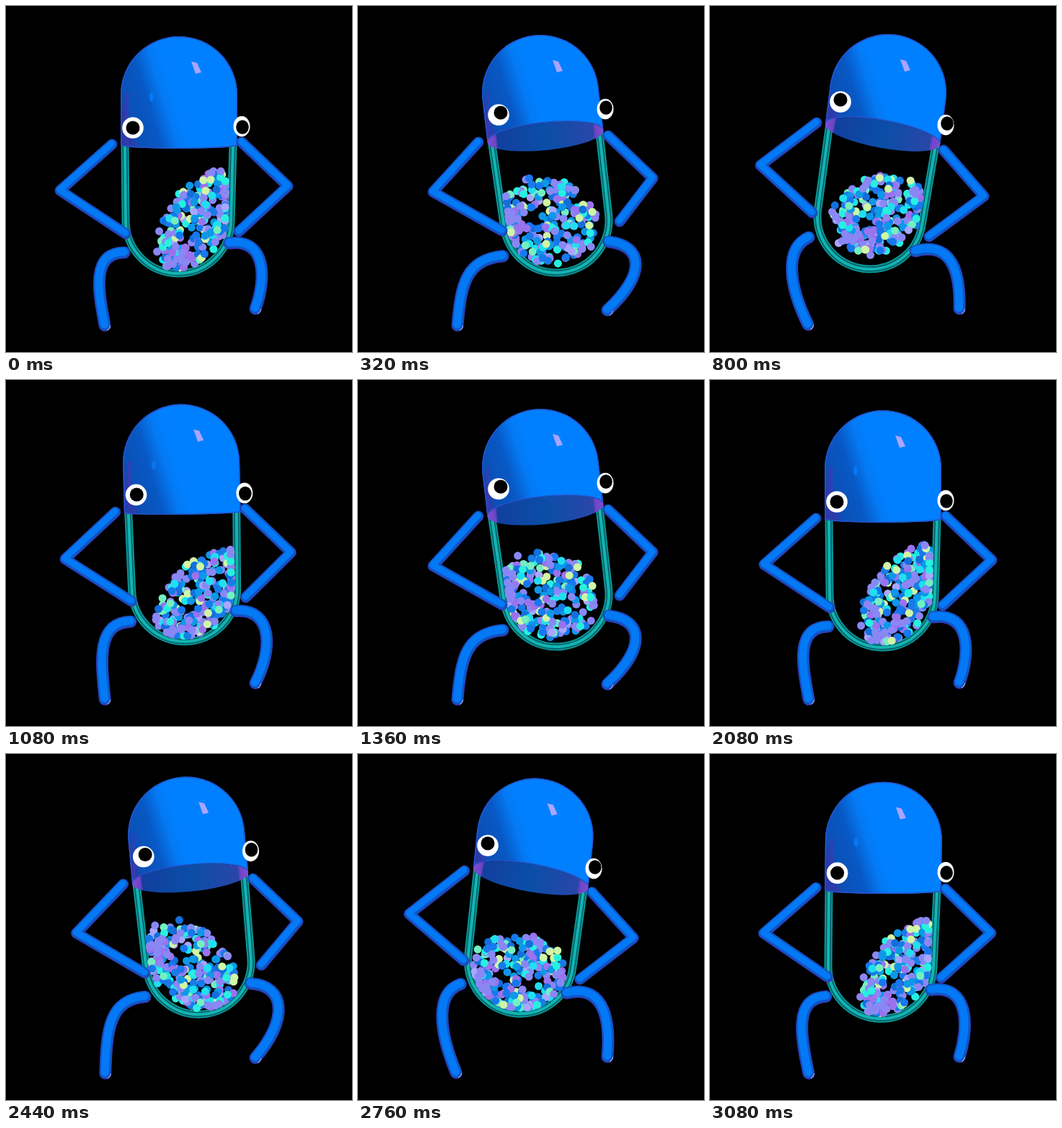
Write an HTML page with a canvas that moves like this. It is 480x480 px and loops after 3120 ms.

```html
<!DOCTYPE html>
<html lang="en">
<head>
<meta charset="utf-8">
<title>Dancing capsule</title>
<style>
html, body { margin: 0; width: 100%; height: 100%; overflow: hidden; background: #000; }
canvas { display: block; width: 100vmin; height: 100vmin; }
</style>
</head>
<body>
<canvas id="stage" width="480" height="480"></canvas>
<script>
const ctx = document.getElementById('stage').getContext('2d');
const LOOP = 3120, BEAT = 1040, STEP = 40, TAU = Math.PI * 2;

// Each joint: x, y when upright, leaning right, leaning left
const BODY = {
  head: [240, 123, 253, 121, 247, 120],
  base: [239, 298, 275, 297, 222, 292],
  rim: [240, 193, 260, 181, 239.5, 178],
  eyeL: [176, 169, 195, 151, 181, 133],
  pupilL: [176, 169, 198, 148, 181, 130],
  eyeR: [327, 167, 343, 143, 327, 165],
  pupilR: [328, 168, 344, 141, 329, 163]
};
const ARMS = [
  [[147, 192, 167, 189, 148, 162], [75, 256, 104, 258, 70, 221], [166, 316, 200, 312, 142, 287]],
  [[327, 189, 347, 180, 324, 200], [391, 250, 409, 239, 380, 264], [323, 313, 363, 299, 304, 320]]
];
const LEGS = [
  [[164, 342, 201, 347, 137, 321], [118, 343, 150, 352, 104, 336], [128, 395, 143, 385, 108, 385], [137, 443, 138, 443, 136, 442]],
  [[310, 329, 348, 327, 285, 340], [362, 322, 396, 333, 341, 325], [361, 380, 400, 372, 347, 380], [346, 420, 346, 422, 346, 420]]
];

// Tracks: time, then values
const SWAY = [[0, 0], [80, .5], [160, 1], [230, 1.23], [320, 1], [360, .78], [440, .3], [520, -.18],
  [600, -.53], [680, -.8], [800, -1], [850, -1.06], [920, -.72], [1000, -.12]];
const LIFT = [[0, 0], [40, 8], [80, 15], [120, 16.5], [160, 11], [220, 2], [280, -1], [320, 0], [360, 9],
  [400, 11.5], [440, 8], [500, 1], [560, 0], [600, 5], [640, 10.5], [680, 6], [740, 1], [800, 0],
  [840, 6], [880, 11], [920, 10], [960, 6], [1000, 3]];
// Pile: centre x, y, long and short radius, slope in degrees
const PILE = [[0, 264, 300, 78, 39, -58], [160, 281, 297, 72, 50, -20], [320, 262, 298, 70, 56, 18],
  [360, 256, 294, 73, 48, 42], [500, 238, 299, 70, 52, 38], [680, 220, 306, 66, 54, 0],
  [800, 232, 289, 66, 48, -30], [1000, 263, 300, 78, 37, -55]];

const COLORS = ['#187be8', '#1778ef', '#126fdc', '#8a87f5', '#8a87f5', '#9b72ee', '#a9a6ff',
  '#20dff0', '#27f0e0', '#0d98e8', '#d0f6a5', '#75efc0'];

let seed = 71;
function rand() {
  seed = (seed * 16807) % 2147483647;
  return seed / 2147483647;
}
const balls = Array.from({ length: 240 }, () => ({
  r: Math.sqrt(rand()) * 1.03,
  a: rand() * TAU,
  phase: rand() * TAU,
  turns: 1 + Math.floor(rand() * 3),
  color: COLORS[Math.floor(rand() * COLORS.length)]
}));

// Smooth cyclic interpolation through a track
function track(keys, t) {
  const n = keys.length;
  const key = i => {
    const wrap = Math.floor(i / n);
    const k = keys[i - wrap * n];
    return [k[0] + wrap * BEAT, ...k.slice(1)];
  };
  let i = n - 1;
  while (keys[i][0] > t) i--;
  const [a, b, c, d] = [key(i - 1), key(i), key(i + 1), key(i + 2)];
  const span = c[0] - b[0], u = (t - b[0]) / span;
  return b.slice(1).map((p, j) => {
    const q = c[j + 1];
    const m = (q - a[j + 1]) / (c[0] - a[0]) * span;
    const k = (d[j + 1] - p) / (d[0] - b[0]) * span;
    const u2 = u * u, u3 = u2 * u;
    return (2 * u3 - 3 * u2 + 1) * p + (u3 - 2 * u2 + u) * m + (3 * u2 - 2 * u3) * q + (u3 - u2) * k;
  });
}

function joint(p, w, lift, wy = Math.abs(w)) {
  const o = w > 0 ? 2 : 4;
  return [p[0] + (p[o] - p[0]) * Math.abs(w), p[1] + (p[o + 1] - p[1]) * wy - lift];
}

function stroke(path, color, width, dx = 0, dy = 0) {
  ctx.save();
  ctx.translate(dx, dy);
  ctx.strokeStyle = color;
  ctx.lineWidth = width;
  ctx.stroke(path);
  ctx.restore();
}

function oval(x, y, rx, ry, color, angle = 0) {
  ctx.fillStyle = color;
  ctx.beginPath();
  ctx.ellipse(x, y, rx, ry, angle, 0, TAU);
  ctx.fill();
}

function limb(path, width) {
  stroke(path, '#3438b4', width);
  stroke(path, '#0c58c6', width - 2, 0, -.6);
  stroke(path, '#0479f5', width - 6, -.5, -1.2);
}

function drawTube(base, rim, tilt, rimTilt) {
  const side = s => [rim[0] + s * 75 * Math.cos(rimTilt), rim[1] + s * 75 * Math.sin(rimTilt)];
  const path = new Path2D();
  path.moveTo(...side(1));
  path.arc(base[0], base[1], 73, tilt, tilt + Math.PI);
  path.lineTo(...side(-1));
  ctx.lineCap = 'butt';
  stroke(path, '#0a9696', 11);
  stroke(path, '#075c68', 7);
  stroke(path, '#12b5b0', 4);
}

function drawBalls(t, base, tilt) {
  const [cx, cy, long, short, deg] = track(PILE, t % BEAT);
  const slope = deg * Math.PI / 180;
  const [c, s] = [Math.cos(slope), Math.sin(slope)];
  const [ct, st] = [Math.cos(tilt), Math.sin(tilt)];
  for (const b of balls) {
    const spin = TAU * b.turns * t / LOOP + b.phase;
    const a = b.a + .3 * Math.sin(spin);
    const px = long * b.r * Math.cos(a), py = short * b.r * Math.sin(a);
    const dx = cx + px * c - py * s + 3 * Math.cos(spin) - base[0];
    const dy = cy + px * s + py * c + 3 * Math.sin(spin) - base[1];
    // Keep the ball inside the glass
    let x = dx * ct + dy * st, y = dy * ct - dx * st;
    const reach = y > 0 ? Math.hypot(x, y) : Math.abs(x);
    if (reach > 65) {
      x *= 65 / reach;
      if (y > 0) y *= 65 / reach;
    }
    oval(base[0] + x * ct - y * st, base[1] + x * st + y * ct, 5.5, 5.5, b.color);
  }
}

function drawCap(head, rim, open, tilt, rimTilt) {
  const [x, y] = head, bow = -5 + 24 * open;
  const cap = new Path2D();
  cap.arc(x, y, 81, Math.PI + tilt, tilt);
  cap.ellipse(rim[0], rim[1], 81, Math.abs(bow), rimTilt, 0, Math.PI, bow > 0);
  cap.closePath();

  const shade = ctx.createLinearGradient(x - 80, y + 20, x - 8, y - 2);
  shade.addColorStop(0, '#2b3bab');
  shade.addColorStop(.12, '#0b50b7');
  shade.addColorStop(.5, '#0858c4');
  shade.addColorStop(.8, '#047af4');
  shade.addColorStop(1, '#0080ff');
  ctx.fillStyle = shade;
  ctx.fill(cap);
  ctx.save();
  ctx.clip(cap);
  stroke(cap, '#2553cc', 3);
  ctx.globalAlpha = .6;
  ctx.fillStyle = '#4a35b5';
  ctx.fillRect(x - 74, y - 2, 4, 62);
  ctx.globalAlpha = 1 - open;
  oval(x - 38, y + 3, 3, 6.5, '#0878f5');
  ctx.restore();

  if (bow > 0) {
    const dx = 81 * Math.cos(rimTilt), dy = 81 * Math.sin(rimTilt);
    const inside = ctx.createLinearGradient(rim[0] - dx, rim[1] - dy, rim[0] + dx, rim[1] + dy);
    [[0, '#7950d8'], [.07, '#7044c4'], [.09, '#123f9f'], [.5, '#0a4ea8'],
      [.91, '#2946a8'], [.93, '#7044c4'], [1, '#7950d8']].forEach(v => inside.addColorStop(...v));
    oval(rim[0], rim[1], 81, bow, inside, rimTilt);
  }

  ctx.fillStyle = '#aaa5ff';
  ctx.beginPath();
  [[17, -46], [25, -44], [31, -31], [23, -29]].forEach(([a, b]) => ctx.lineTo(x + a, y + b));
  ctx.fill();
}

function draw(t) {
  const beat = t % BEAT;
  const [w] = track(SWAY, beat), [lift] = track(LIFT, beat);
  const open = Math.min(1, 1.6 * w * w);
  const at = {};
  for (const name in BODY) {
    const early = name !== 'head' && name !== 'base';
    at[name] = joint(BODY[name], w, lift, early ? open : undefined);
  }
  const tilt = Math.atan2(at.head[0] - at.base[0], at.base[1] - at.head[1]);
  const rimTilt = (w > 0 ? -.102 : .18) * open;

  ctx.fillStyle = '#000';
  ctx.fillRect(0, 0, 480, 480);
  drawTube(at.base, at.rim, tilt, rimTilt);
  drawBalls(t, at.base, tilt);
  drawCap(at.head, at.rim, open, tilt, rimTilt);

  ctx.lineCap = ctx.lineJoin = 'round';
  for (const leg of LEGS) {
    const [hip, c1, c2, foot] = leg.map((p, i) => joint(p, w, lift * [1, 1, .5, 0][i]));
    const path = new Path2D();
    path.moveTo(...hip);
    path.bezierCurveTo(...c1, ...c2, ...foot);
    limb(path, 17);
    const glint = new Path2D();
    glint.arc(foot[0], foot[1], 7.5, .1, 1.1);
    stroke(glint, '#a9a6f5', 1.2);
  }
  for (const arm of ARMS) {
    const path = new Path2D();
    arm.forEach(p => path.lineTo(...joint(p, w, lift)));
    limb(path, 15);
  }

  oval(...at.eyeL, 14.8, 14.8, '#fff');
  oval(...at.pupilL, 9.5, 9.5, '#000');
  oval(...at.eyeR, 11.5, 14.3, '#fff');
  oval(...at.pupilR, 8.8, 9.8, '#000');
}

const start = performance.now();
function tick() {
  const t = (performance.now() - start) % LOOP;
  draw(Math.floor(t / STEP) * STEP);
  requestAnimationFrame(tick);
}
tick();
</script>
</body>
</html>
```
